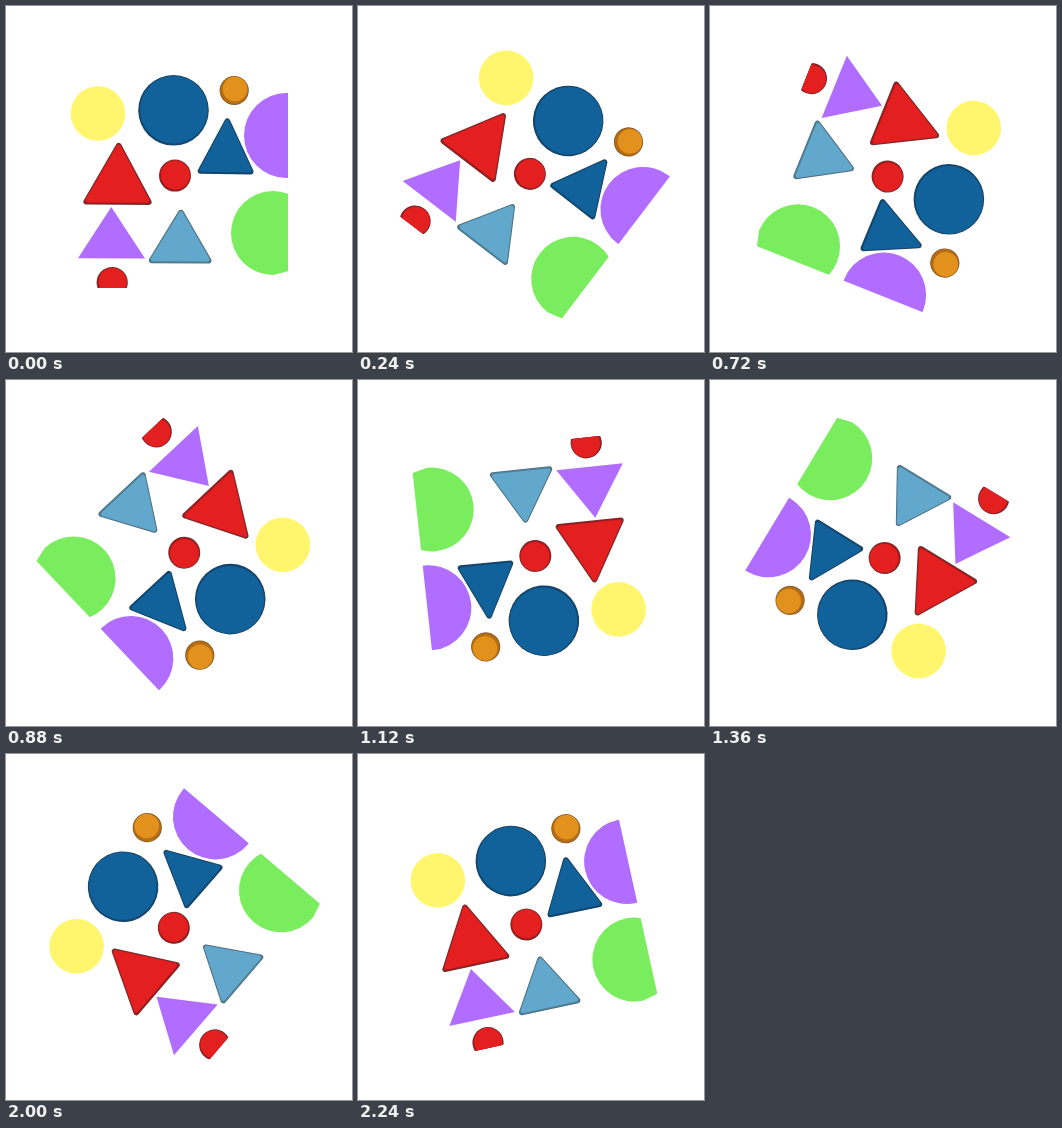
Write an HTML page with a canvas that moves like this. It is 346x346 px and loops after 2320 ms.

```html
<!DOCTYPE html>
<html lang="en">
<head>
<meta charset="utf-8">
<title>Turning shapes</title>
<style>
  html, body { margin: 0; width: 100%; height: 100%; overflow: hidden; background: #fff; }
  canvas { display: block; }
</style>
</head>
<body>
<canvas id="stage" width="346" height="346"></canvas>
<script>
const ctx = document.getElementById('stage').getContext('2d');
const SIZE = 346, MID = SIZE / 2, STEP = 80, STEPS = 29;
const EDGE = 282; // right and bottom limit of the turning sheet

const RED = { face: '#e31f20', rim: '#a51719', line: '#66383a' };
const BLUE = { face: '#11619a', rim: '#0c4876', line: '#25435a' };
const SKY = { face: '#62a8cd', rim: '#4b819b', line: '#536c78' };
const ORANGE = { face: '#e3911d', rim: '#b56c12', line: '#7d5a2c' };

function disc(x, y, r, color) {
  ctx.beginPath();
  ctx.arc(x, y, r, 0, Math.PI * 2);
  ctx.fillStyle = color;
  ctx.fill();
}

function poly(points, color, radius = 0) {
  const n = points.length;
  const [a, b] = [points[n - 1], points[0]];
  ctx.beginPath();
  ctx.moveTo((a[0] + b[0]) / 2, (a[1] + b[1]) / 2);
  points.forEach((p, i) => {
    const q = points[(i + 1) % n];
    ctx.arcTo(p[0], p[1], q[0], q[1], radius);
  });
  ctx.closePath();
  ctx.fillStyle = color;
  ctx.fill();
}

// Raised pieces: thin dark line, shaded rim, then the face shifted to the light
function coin(x, y, r, tone, depth = 0.6) {
  disc(x, y, r, tone.line);
  disc(x, y, r - 0.7, tone.rim);
  disc(x + depth * 0.6, y - depth, r - 0.9 - depth, tone.face);
}

function wedge(points, tone) {
  const cx = (points[0][0] + points[1][0] + points[2][0]) / 3;
  const cy = (points[0][1] + points[1][1] + points[2][1]) / 3;
  const shrink = (k, dy) => points.map(([x, y]) => [cx + (x - cx) * k, cy + (y - cy) * k + dy]);
  poly(points, tone.line, 2.8);
  poly(shrink(0.965, 0), tone.rim, 2.6);
  poly(shrink(0.925, -0.6), tone.face, 2.2);
}

function drawSheet() {
  ctx.beginPath();
  ctx.rect(0, 0, EDGE, EDGE);
  ctx.clip();

  disc(92, 107.5, 27.3, '#fff66e');
  disc(280.5, 129.5, 42.5, '#b06dff');

  // Green disc with a slightly flattened foot
  ctx.beginPath();
  ctx.arc(267, 227, 42, Math.PI / 2, Math.PI * 2);
  ctx.lineTo(309, 227);
  ctx.lineTo(EDGE, 265.3);
  ctx.closePath();
  ctx.fillStyle = '#7aed5f';
  ctx.fill();

  poly([[105.3, 201], [139, 252.6], [72, 252.2]], '#b06dff');

  coin(167.5, 104.3, 35.3, BLUE);
  coin(228.2, 84.5, 14.6, ORANGE, 1.4);
  coin(169, 169.6, 16, RED);
  coin(106.2, 276.6, 15.6, RED);

  wedge([[221.6, 108.8], [249.2, 168.5], [189.8, 167.7]], BLUE);
  wedge([[112.8, 133.8], [147.6, 198.9], [75.2, 198.6]], RED);
  wedge([[175, 201], [207.6, 257.6], [140.6, 257.2]], SKY);
}

function draw(now) {
  const step = Math.floor((now + 0.01) / STEP) % STEPS;
  ctx.fillStyle = '#fff';
  ctx.fillRect(0, 0, SIZE, SIZE);
  ctx.save();
  ctx.translate(MID, MID);
  ctx.rotate(step / STEPS * Math.PI * 2);
  ctx.translate(-MID, -MID);
  drawSheet();
  ctx.restore();
}

function tick() {
  draw(performance.now());
  requestAnimationFrame(tick);
}
tick();
</script>
</body>
</html>
```
